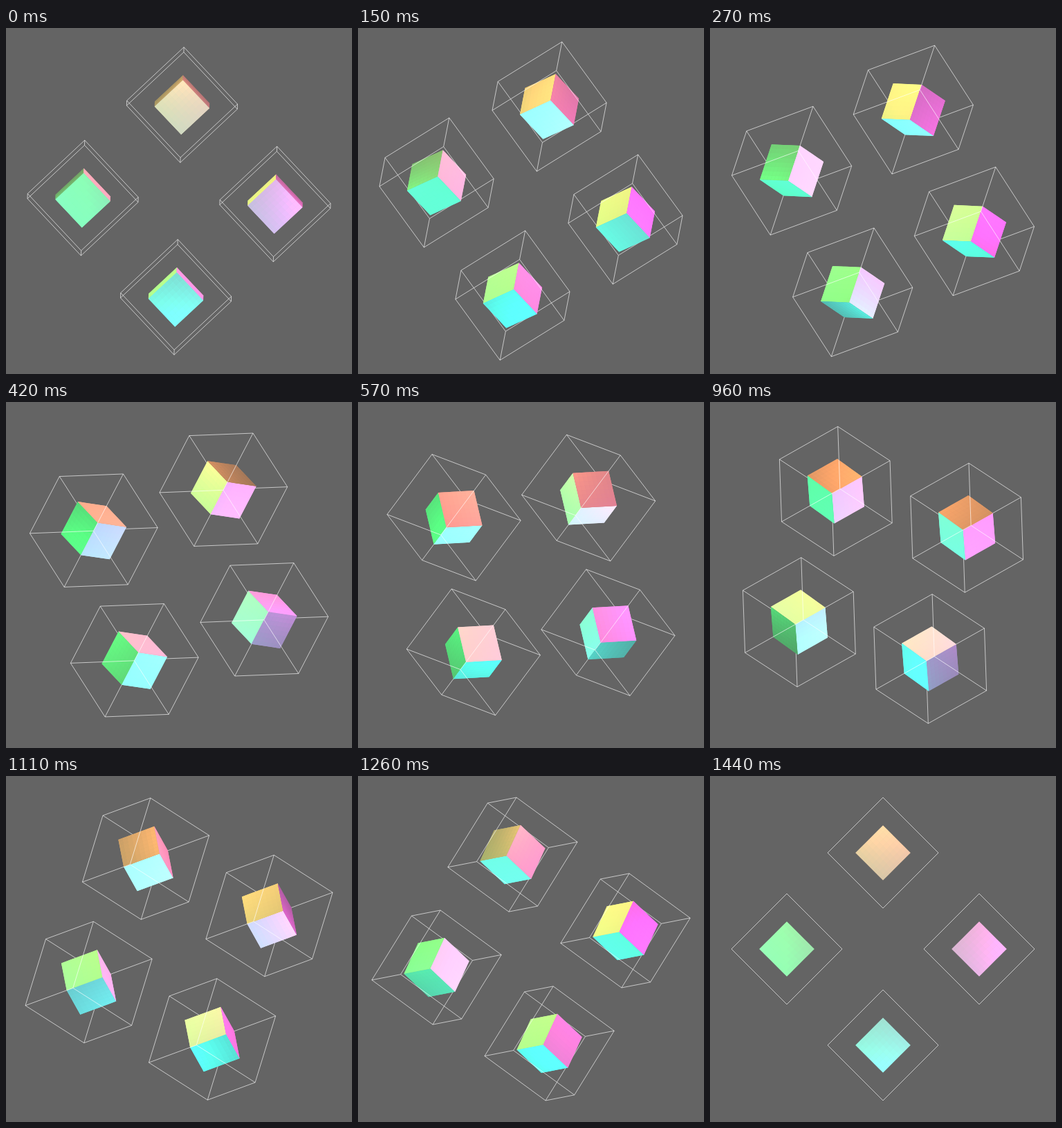
Write an HTML page with a canvas that moves like this. It is 500x500 px and loops after 1.47 s.

```html
<!DOCTYPE html>
<html lang="en">
<head>
<meta charset="utf-8">
<title>Tumbling cubes</title>
<style>
  html, body { margin: 0; width: 100%; height: 100%; overflow: hidden; background: #646464; }
  canvas { display: block; width: 100vw; height: 100vh; }
</style>
</head>
<body>
<canvas id="stage" width="500" height="500"></canvas>
<script>
const ctx = document.getElementById('stage').getContext('2d');
const STEP = 30, STEPS = 49;
const MID = 250, ORBIT = 139, SOLID = 28, FRAME = 56.57, CELLS = 8;
const AMBIENT = 70;
const LIGHTS = [
  { pos: [250, 0, 100], rgb: [225, 118, 45] },
  { pos: [0, 250, 100], rgb: [25, 220, 75] },
  { pos: [500, 250, 100], rgb: [235, 50, 205] },
  { pos: [250, 500, 100], rgb: [25, 212, 195] }
];

const add = (a, b, k) => a.map((v, i) => v + b[i] * k);
const dot = (a, b) => a[0] * b[0] + a[1] * b[1] + a[2] * b[2];

function spin([x, y, z], a) {
  const c = Math.cos(a), s = Math.sin(a);
  return [x * c - y * s, x * s + y * c, z];
}

function tilt([x, y, z], a) {
  const c = Math.cos(a), s = Math.sin(a);
  return [x, y * c + z * s, z * c - y * s];
}

// The three axes of a box: turned 45 degrees, tilted, then spun with the group
function boxAxes(tip, turn) {
  return [[1, 0, 0], [0, 1, 0], [0, 0, 1]]
    .map(e => spin(tilt(spin(e, Math.PI / 4), tip), turn));
}

function shade(point, normal) {
  const rgb = [AMBIENT, AMBIENT, AMBIENT];
  for (const light of LIGHTS) {
    const ray = add(light.pos, point, -1);
    const dist = Math.hypot(...ray);
    const power = Math.max(0, dot(ray, normal) / dist) * 1.45 / (1 + dist / 300);
    light.rgb.forEach((v, i) => { rgb[i] += v * power; });
  }
  return `rgb(${rgb.map(v => Math.min(255, Math.round(v)))})`;
}

function quad(mid, u, v, half, color) {
  ctx.beginPath();
  for (const [i, j] of [[-1, -1], [1, -1], [1, 1], [-1, 1]]) {
    const p = add(add(mid, u, i * half), v, j * half);
    ctx.lineTo(p[0], p[1]);
  }
  ctx.fillStyle = color;
  ctx.fill();
}

function drawSolid(center, axes) {
  axes.forEach((axis, k) => {
    if (Math.abs(axis[2]) < 1e-6) return;
    const normal = axis.map(v => v * Math.sign(axis[2]));
    const u = axes[(k + 1) % 3], v = axes[(k + 2) % 3];
    const face = add(center, normal, SOLID);
    quad(face, u, v, SOLID, shade(face, normal));
    const half = SOLID / CELLS;
    for (let i = 0; i < CELLS; i++) {
      for (let j = 0; j < CELLS; j++) {
        const mid = add(add(face, u, (2 * i + 1 - CELLS) * half), v, (2 * j + 1 - CELLS) * half);
        quad(mid, u, v, half, shade(mid, normal));
      }
    }
  });
}

function drawFrame(center, axes, front) {
  ctx.beginPath();
  axes.forEach((axis, k) => {
    for (const i of [-1, 1]) {
      for (const j of [-1, 1]) {
        const offset = add(axes[(k + 1) % 3].map(v => v * i), axes[(k + 2) % 3], j);
        if (offset[2] > 1e-6 !== front) continue;
        const mid = add(center, offset, FRAME);
        const a = add(mid, axis, -FRAME), b = add(mid, axis, FRAME);
        ctx.moveTo(a[0], a[1]);
        ctx.lineTo(b[0], b[1]);
      }
    }
  });
  ctx.stroke();
}

function draw(ms) {
  const step = Math.floor((ms + 0.5) / STEP) % STEPS;
  const t = (step + 1) / STEPS;
  const turn = t * Math.PI / 2;
  const solid = boxAxes(4 * turn, turn);
  const frame = boxAxes(2 * turn, turn);
  const flat = t === 1;

  ctx.fillStyle = '#646464';
  ctx.fillRect(0, 0, 500, 500);
  ctx.strokeStyle = 'rgba(255,255,255,.8)';
  ctx.lineWidth = 0.8;
  for (let k = 0; k < 4; k++) {
    const a = turn + k * Math.PI / 2;
    const center = [MID + ORBIT * Math.cos(a), MID + ORBIT * Math.sin(a), 0];
    if (!flat) drawFrame(center, frame, false);
    drawSolid(center, solid);
    drawFrame(center, frame, true);
  }
}

function tick() {
  draw(performance.now());
  requestAnimationFrame(tick);
}
tick();
</script>
</body>
</html>
```
